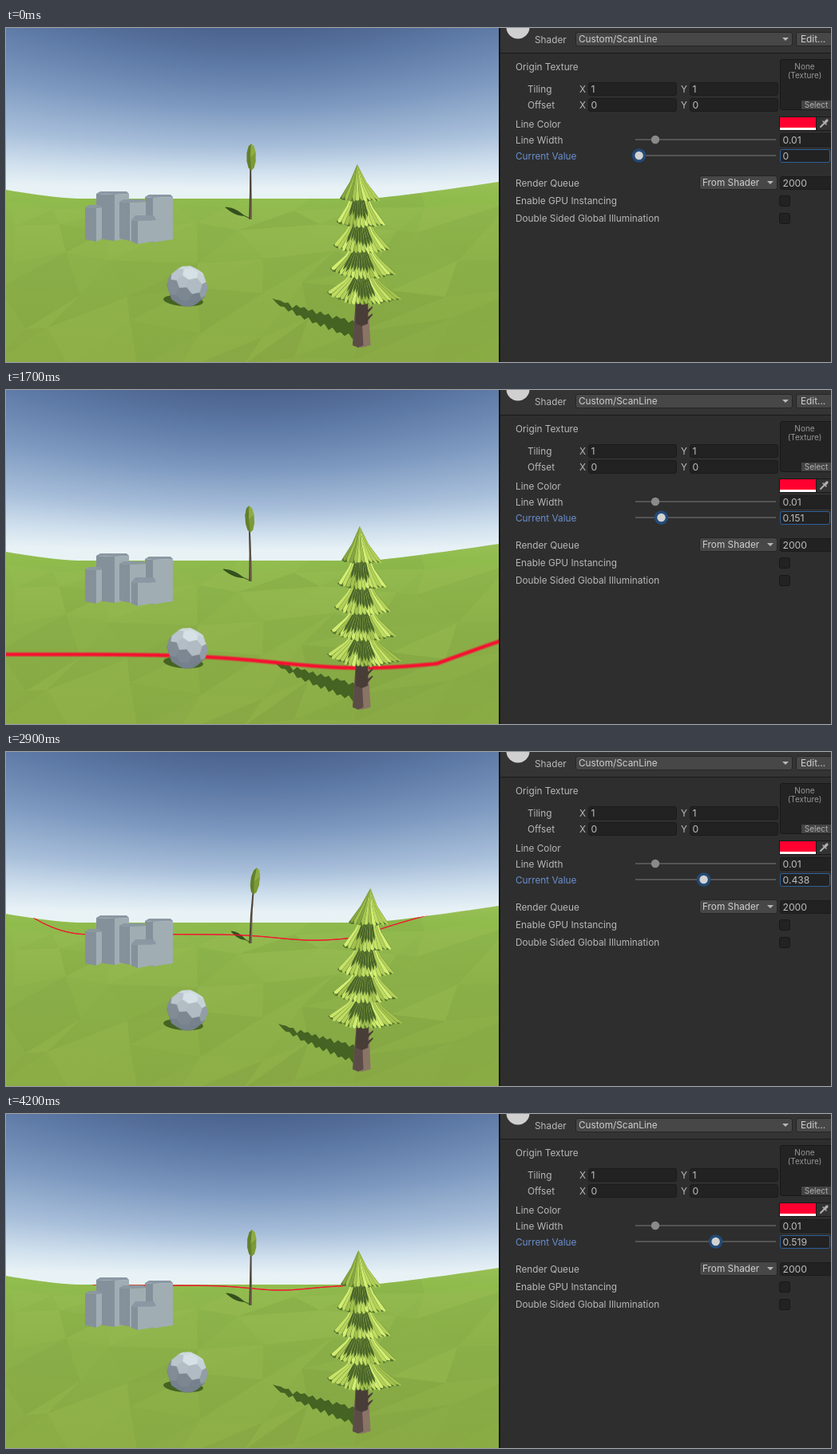
An HTML page with a canvas for the animation above (4.3 s loop, 1033x419 px).

```html
<!DOCTYPE html>
<html lang="en">
<head>
<meta charset="utf-8">
<title>Scan line shader</title>
<style>
  html, body { margin: 0; width: 100%; height: 100%; overflow: hidden; background: #2e2e2e; }
  canvas { display: block; width: 1033px; height: 419px; }
</style>
</head>
<body>
<canvas id="stage" width="1033" height="419"></canvas>
<script>
const ctx = document.getElementById('stage').getContext('2d');
const LOOP = 4300, STEP = 100, VIEW = 617, HEIGHT = 419;
const FONT = 'Inter, "Liberation Sans", sans-serif';
const same = (x, y) => [x, y];
const mix = (a, b, k) => a + (b - a) * k;

function trace(pts, warp = same) {
  ctx.beginPath();
  for (const [x, y] of pts) ctx.lineTo(...warp(x, y));
  ctx.closePath();
}
function poly(color, pts, warp) {
  trace(pts, warp);
  ctx.fillStyle = color;
  ctx.fill();
}
function rect(color, x, y, w, h) {
  ctx.fillStyle = color;
  ctx.fillRect(x, y, w, h);
}
function disc(color, x, y, r) {
  ctx.beginPath();
  ctx.arc(x, y, r, 0, Math.PI * 2);
  ctx.fillStyle = color;
  ctx.fill();
}
function fade(y0, y1, stops) {
  const g = ctx.createLinearGradient(0, y0, 0, y1);
  for (const [at, c] of stops) g.addColorStop(at, c);
  return g;
}
function random(seed) {
  return () => (seed = (seed * 16807) % 2147483647) / 2147483647;
}
const range = (n, fn) => Array.from({ length: n }, (_, i) => fn(i));
const swing = (t, peak) => Math.cos(2 * Math.PI * (t - peak) / LOOP);

// ---- landscape ----
const SKY = [[0, '#4a628e'], [.24, '#5f7ba7'], [.47, '#7d99c0'], [.7, '#a8bfda'], [.84, '#cfdfed'], [.94, '#e8f2f6'], [1, '#e8f3f5']];

function ridge(x) {
  const left = Math.max(0, 90 - x) / 90, right = Math.max(0, x - 455) / 162;
  return 214 - 11 * left ** 1.4 - 21 * right ** 1.15;
}
const GROUND = [...range(63, i => [i * 10, ridge(i * 10)]), [VIEW + 3, HEIGHT], [0, HEIGHT]];

// away from the middle the same height on screen is a lower elevation
function sky() {
  const focal = 363;
  for (let x = 0; x < VIEW; x += 4) {
    const reach = 214 * Math.hypot(focal, x - VIEW / 2) / focal;
    rect(fade(214 - reach, 214, SKY), x, 0, 4, 216);
  }
}

function ground() {
  poly(fade(194, HEIGHT, [[0, '#97bf55'], [.1, '#8fbb4c'], [.16, '#90b84e'], [.45, '#8db14a'], [1, '#8aab45']]), GROUND);
  ctx.save();
  trace(GROUND);
  ctx.clip();
  const rnd = random(77), cols = 8, rows = 6;
  const grid = range(rows + 1, j => range(cols + 1, i => [
    VIEW * (i + (rnd() - .5) * .7) / cols,
    205 + 220 * ((j + (rnd() - .5) * .5) / rows) ** 1.4
  ]));
  for (let j = 0; j < rows; j++) for (let i = 0; i < cols; i++) {
    const a = grid[j][i], b = grid[j][i + 1], c = grid[j + 1][i], d = grid[j + 1][i + 1];
    for (const tri of [[a, b, c], [b, d, c]]) {
      const k = rnd() - .5;
      poly(k > 0 ? `rgba(205,225,110,${k * .12})` : `rgba(60,95,30,${-k * .12})`, tri);
    }
  }
  ctx.restore();
}

// a prism with a shaded left face, a lit right face and a flat top
function column(left, mid, right, top, base, lip) {
  poly('#84919b', [[left, top], [mid, top + 1], [mid, base], [left, base - 3]]);
  poly('#a0adb3', [[mid, top + 1], [right, top], [right, base - 4], [mid, base]]);
  poly('#8b98a3', [[left, top], [left + 5, top - lip], [right - 3, top - lip], [right, top], [mid, top + 1]]);
}
function rocks() {
  column(113, 136, 154, 208, 267, 3);
  column(174, 184, 209, 212, 269, 3);
  column(99, 113, 120, 225, 268, 3);
  column(142, 155, 175, 218, 267, 3);
  column(157, 165, 188, 241, 271, 6);
}

// ---- boulder: icosahedron with its corners cut off ----
function boulderFaces() {
  const g = (1 + Math.sqrt(5)) / 2, verts = [];
  for (const a of [-1, 1]) for (const b of [-g, g]) verts.push([0, a, b], [a, b, 0], [b, 0, a]);
  const near = (p, q) => Math.abs(Math.hypot(...p.map((v, k) => v - q[k])) - 2) < .01;
  const cut = (p, q) => p.map((v, k) => mix(v, q[k], 1 / 3));
  const faces = verts.map(p => verts.filter(q => near(p, q)).map(q => cut(p, q)));
  verts.forEach((p, i) => verts.forEach((q, j) => verts.forEach((r, k) => {
    if (i < j && j < k && near(p, q) && near(q, r) && near(p, r)) {
      faces.push([cut(p, q), cut(q, p), cut(q, r), cut(r, q), cut(r, p), cut(p, r)]);
    }
  })));
  return faces;
}
function turn([x, y, z]) {
  const spin = (a, b, w) => [a * Math.cos(w) - b * Math.sin(w), a * Math.sin(w) + b * Math.cos(w)];
  [x, z] = spin(x, z, .3);
  [y, z] = spin(y, z, .75);
  [x, y] = spin(x, y, .15);
  return [x, y, z];
}
const FACES = boulderFaces().map(f => f.map(turn)).map(pts => {
  const mid = [0, 1, 2].map(k => pts.reduce((s, p) => s + p[k], 0) / pts.length);
  const len = Math.hypot(...mid);
  return { pts, normal: mid.map(v => v / len) };
}).filter(f => f.normal[2] > 0);

function boulder() {
  ctx.beginPath();
  ctx.ellipse(222, 342, 25, 7, .08, 0, Math.PI * 2);
  ctx.fillStyle = '#456322';
  ctx.fill();
  const scale = 25.5 / 1.65;
  for (const { pts, normal: [nx, ny, nz] } of FACES) {
    const lit = Math.max(0, nx * .25 - ny * .8 + nz * .5);
    const shown = pts.map(([x, y]) => [227 + x * scale, 324 + y * scale]);
    shown.sort(([ax, ay], [bx, by]) => {
      const cx = 227 + nx * 23, cy = 324 + ny * 23;
      return Math.atan2(ay - cy, ax - cx) - Math.atan2(by - cy, bx - cx);
    });
    const c = `rgb(${mix(118, 220, lit)},${mix(129, 231, lit)},${mix(141, 237, lit)})`;
    poly(c, shown);
    ctx.strokeStyle = c;
    ctx.lineWidth = .6;
    ctx.stroke();
  }
}

// ---- small tree ----
function smallTree(d) {
  const bend = (x, y) => [x + d * ((240 - y) / 95) ** 2, y];
  const trunk = (color, l, r) => poly(color,
    [[l, 240], [l + .8, 205], [l + 1.2, 172], [r - .2, 172], [r, 205], [r + .5, 240]], bend);
  trunk('#4f4439', 304.2, 307.4);
  trunk('#806d58', 306.1, 307.4);
  const rim = range(10, i => {
    const a = i * Math.PI / 5 - Math.PI / 2;
    return [307.3 + 5.8 * Math.cos(a), 162 + 16.8 * Math.sin(a)];
  });
  poly('#7c9a35', rim, bend);
  poly('#627f2e', [rim[0], [306, 162], ...rim.slice(5)], bend);
  poly('#8eac40', [...rim.slice(0, 3), [306, 162]], bend);
}
function smallShadow(d) {
  const slide = (x, y) => [x + d * ((306 - x) / 31), y];
  const side = s => range(9, i => [mix(275, 306, i / 8),
    225 + 14 * (i / 8) + s * (i < 6 ? 2.6 * Math.sin(Math.PI * i / 6) : 0) + s * .5]);
  poly('#34501e', [...side(-1), ...side(1).reverse()], slide);
}

// ---- fir, tiers counted from the top ----
const LIMES = ['#c6e367', '#b2d058', '#d2ee72', '#a3c24e', '#bfdd62'];

function tier(i, bend) {
  const rnd = random(31 + i * 57);
  const cx = 442.5 + 1.4 * i, half = 26 + 5.5 * i, low = 218 + 32.3 * i, top = low - 47;
  const n = 10 + i * 2, cap = i ? 7 : 0, apex = i ? cx - 2 : 439;
  const at = (u, f) => {
    const s = 2 * u - 1;
    const lift = s * s * (s < 0 ? 3 + 3 * i : 2 + 1.4 * i);
    const spread = .6 * f + .4 * f * f;
    return [mix(apex + s * cap, cx + s * half, spread), top + (low - lift - top) * f];
  };
  const rim = u => [at(u, 0), at(u, .5)];
  // dark underside, then the lit blades
  poly('#587530', [...range(n + 1, k => at(k / n, .97 + .03 * (k % 2))), at(1, .5), at(1, 0), at(0, 0), at(0, .5)], bend);
  for (let k = 0; k < n; k++) {
    const u = k / n, w = (k + .92) / n, long = .97 + rnd() * .06;
    const tone = i === 0 && u < .4 ? ['#86a642', '#a5c550'][k % 2] : LIMES[Math.floor(rnd() * LIMES.length)];
    poly(tone, [...rim(u), at(u, .88 + rnd() * .09), at(mix(u, w, .6), long), at(w, long - .03), ...rim(w).reverse()], bend);
    // shade cast by the tier above
    if (i && u > .12 && u < .72) {
      const a = .62 + rnd() * .2;
      poly('#4a6529', [at(u, .2), at(u, a - .08), at(mix(u, w, .5), a + .08), at(w, a - .05), at(w, .2)], bend);
    }
  }
}

function fir(d) {
  const bend = (x, y) => [x + d * (Math.max(0, 400 - y) / 230) ** 2, y];
  const bark = (color, l, r, y0, y1) => poly(color,
    [[l, y0], [r, y0], [r + (y1 > 390 ? 3.5 : 0), y1], [mix(l, r, .5), y1 + 3], [l - (y1 > 390 ? 4 : 0), y1]], bend);
  bark('#8a7466', 438, 453, 340, 398);
  bark('#5c4c47', 438, 444, 340, 398);
  bark('#493d37', 438, 453, 340, 371);
  for (const y of [351, 360]) poly('#493d37', [[451, y + 4], [459, y - 2], [459, y], [452, y + 8]], bend);
  for (let i = 4; i >= 0; i--) tier(i, bend);
}

function firShadow(d) {
  const slide = (x, y) => {
    const k = d * (440 - x) / 107;
    return [x + k * .45, y + k * .1];
  };
  const rnd = random(9), n = 22;
  const edge = (height, power, side) => range(n, k => {
    const p = k / (n - 1);
    return [mix(333, 439, p), 339 + height * p ** power + side * (k % 2) * (2 + rnd() * 4) * Math.min(1, p * 4)];
  });
  poly('#456322', [...edge(29, 1, 1), [441, 384], [442, 397], ...edge(53, .7, -1).reverse()], slide);
}

// ---- scan line: where the ground lies at depth v ----
function contour(x, v) {
  const q = Math.log(1 / v);
  const base = 170 + 60 * q + 13.5 * q * q;
  const dip = 9 * q * Math.exp(-(((x - 460 + 50 / (q * q)) / (80 * q)) ** 2));
  const right = .27 * Math.max(0, x - 360 - 95 * q);
  const left = .0045 * Math.max(0, 218 - 140 * q - x) ** 2;
  return base + dip - right - left;
}
function scanLine(v) {
  if (v < .07) return;
  ctx.save();
  trace(GROUND);
  ctx.clip();
  ctx.beginPath();
  for (let x = -10; x <= 630; x += 5) ctx.lineTo(x, contour(x, v));
  const w = Math.max(1.2, .3 / v ** 1.5);
  for (const [k, a] of [[1.3, .2], [1.05, .35], [.8, .5], [.5, .9]]) {
    ctx.lineWidth = Math.max(1, w * k);
    ctx.strokeStyle = `rgba(250,12,48,${a})`;
    ctx.stroke();
  }
  ctx.restore();
}

// ---- inspector ----
function text(s, x, mid, color = '#b8b8b8', size = 11.8, align = 'left') {
  ctx.font = `${size}px ${FONT}`;
  ctx.textAlign = align;
  ctx.fillStyle = color;
  ctx.fillText(s, x, mid + size * .36);
}
function box(x, y, w, h, fill, edge) {
  ctx.beginPath();
  ctx.roundRect(x + .5, y + .5, w - 1, h - 1, 2.5);
  ctx.fillStyle = fill;
  ctx.fill();
  ctx.strokeStyle = edge;
  ctx.lineWidth = 1;
  ctx.stroke();
}
function field(s, x, y, w, edge = '#1b1b1b') {
  box(x, y, w, 17, '#222222', edge);
  text(s, x + 3.5, y + 9, '#bdbdbd', 12.2);
}
function dropdown(s, x, y, w) {
  box(x, y, w, 18, '#474747', '#262626');
  text(s, x + 4, y + 9, '#cfcfcf');
  const ax = x + w - 9;
  poly('#b8b8b8', [[ax - 4, y + 7], [ax + 4, y + 7], [ax, y + 11]]);
}
function slider(name, x, y, color) {
  text(name, 638, y + 1, color);
  rect('#555555', 788, y - 1, 176, 2);
  if (color) disc('#234a76', x, y, 8.8);
  disc(color ? '#d2d2d2' : '#8a8a8a', x, y, 5.2);
}
function check(name, y) {
  text(name, 638, y);
  box(968, y - 7, 14, 14, '#222222', '#181818');
}
function dropper() {
  ctx.lineCap = 'round';
  ctx.strokeStyle = '#b0b0b0';
  for (const [x, y, dx, dy, w] of [[1020, 124, 5, -5, 2], [1023, 117, 4, 4, 1.6], [1026, 118, 2, -2, 3.2]]) {
    ctx.beginPath();
    ctx.moveTo(x, y);
    ctx.lineTo(x + dx, y + dy);
    ctx.lineWidth = w;
    ctx.stroke();
  }
  ctx.lineCap = 'butt';
}

function inspector(v) {
  rect('#2e2e2e', VIEW, 0, 416, HEIGHT);
  rect('#343434', VIEW, 0, 416, 31);
  rect('#1b1b1b', VIEW, 31, 416, 1);
  rect('#171717', VIEW, 0, 2, HEIGHT);
  disc('#d0d0d0', 641, -1, 14.5);

  text('Shader', 662, 15);
  dropdown('Custom/ScanLine', 713, 5, 272);
  box(989, 5, 50, 18, '#474747', '#262626');
  text('Edit...', 995, 14, '#cfcfcf');

  text('Origin Texture', 638, 49);
  box(969, 39, 66, 64, '#232323', '#191919');
  text('None', 1000, 48, '#969696', 10, 'center');
  text('(Texture)', 1000, 59.5, '#969696', 10, 'center');
  rect('#444444', 996, 91, 37, 11);
  text('Select', 1014.5, 96.5, '#b0b0b0', 10, 'center');
  for (const [name, n, y] of [['Tiling', '1', 77], ['Offset', '0', 97]]) {
    text(name, 653, y);
    text('X', 718, y);
    field(n, 729, y - 9, 111);
    text('Y', 845, y);
    field(n, 856, y - 9, 111);
  }

  text('Line Color', 638, 121);
  rect('#191919', 968, 111, 65, 18);
  rect('#ff0030', 969, 112, 45, 13);
  rect('#ffffff', 969, 125, 45, 3);
  rect('#333333', 1015, 112, 18, 16);
  dropper();

  slider('Line Width', 813, 140);
  field('0.01', 969, 132, 66);
  slider('Current Value', 792.6 + v * 185, 160, '#6a8fce');
  field(String(+v.toFixed(3)), 969, 152, 63, '#2f5f98');

  text('Render Queue', 638, 195);
  dropdown('From Shader', 868, 185, 98);
  field('2000', 969, 186, 66);
  check('Enable GPU Instancing', 217);
  check('Double Sided Global Illumination', 239);
}

// ---- timing: a hand-dragged slider, smooth between a few moments ----
const DRAG = [[600, 0], [1300, .081], [1700, .151], [2500, .346], [3300, .503], [3600, .519]];

function dragged(t) {
  const last = DRAG.length - 1;
  if (t <= DRAG[0][0]) return 0;
  if (t >= DRAG[last][0]) return DRAG[last][1];
  const slope = i => (DRAG[i + 1][1] - DRAG[i][1]) / (DRAG[i + 1][0] - DRAG[i][0]);
  const tangent = i => i === 0 || i === last ? 0 : 2 / (1 / slope(i - 1) + 1 / slope(i));
  const i = DRAG.findIndex(([at]) => at > t) - 1;
  const [t0, a] = DRAG[i], [t1, b] = DRAG[i + 1];
  const h = t1 - t0, u = (t - t0) / h;
  return mix(a, b, u * u * (3 - 2 * u))
    + h * u * (1 - u) * (tangent(i) * (1 - u) - tangent(i + 1) * u);
}

function draw(t) {
  const v = dragged(t);
  const firLean = 11.5 * swing(t, 2900) + 6;
  const smallLean = 6.8 * swing(t, 3150) + .5;

  ctx.save();
  ctx.beginPath();
  ctx.rect(0, 0, VIEW, HEIGHT);
  ctx.clip();
  sky();
  ground();
  smallShadow(smallLean);
  firShadow(firLean);
  scanLine(v);
  smallTree(smallLean);
  rocks();
  boulder();
  fir(firLean);
  ctx.restore();
  inspector(v);
}

const start = performance.now();
function frame() {
  const t = (performance.now() - start) % LOOP;
  draw(Math.floor(t / STEP) * STEP);
  requestAnimationFrame(frame);
}
frame();
</script>
</body>
</html>
```
